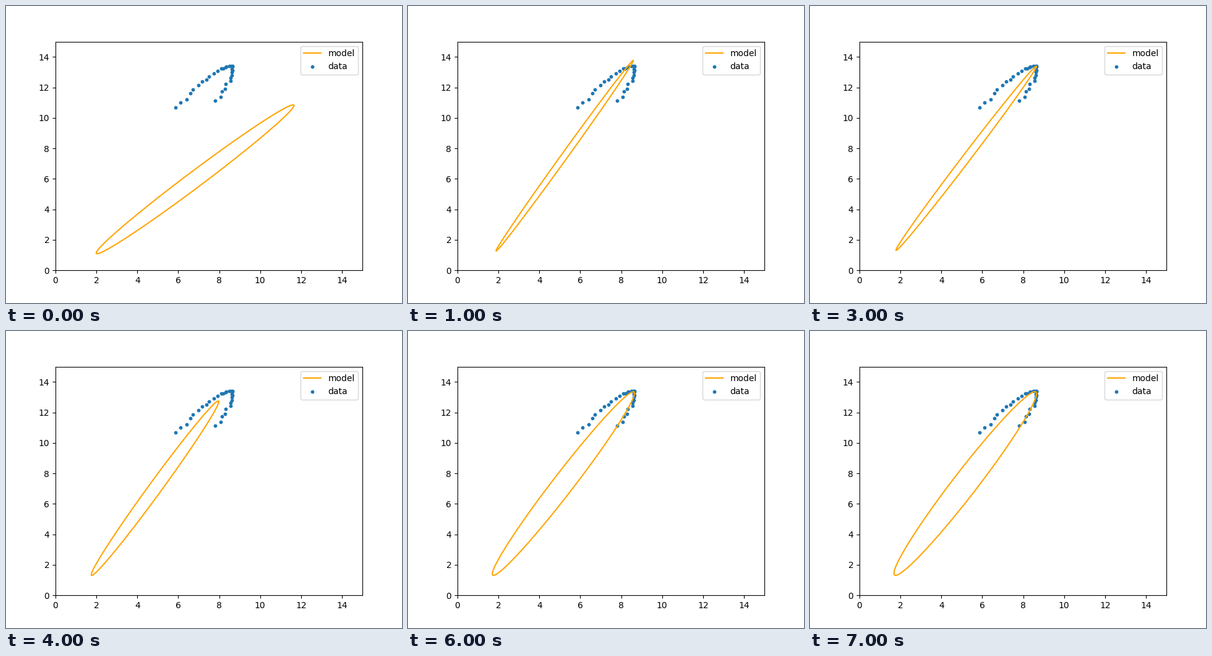
Recreate the animation shown at these times as a matplotlib script. Size 640x480 px, loop 8 s.

```python
import numpy as np
import matplotlib.pyplot as plt
from matplotlib.animation import FuncAnimation

STEPS = 8

# Upper right end of the model and its slimness at the key steps of the fit
KEYS = [0, 1, 3, 4, 5, 7]
RIGHT = [11.65, 8.59, 8.64, 7.98, 8.65, 8.65]
TOP = [10.85, 13.76, 13.38, 12.75, 13.35, 13.36]
PHASE = [0.135, 0.057, 0.071, 0.125, 0.152, 0.215]


def noisy_arc(count=30, step=0.08, noise=0.04):
    """Points along part of a slanted ellipse."""
    rng = np.random.default_rng(4)
    i = np.arange(count)
    x = 5.87 + 2.8 * np.cos(step * (i - 19.5))
    y = 9.22 + 4.2 * np.cos(step * (i - 15.2))
    return x + rng.normal(0, noise, count), y + rng.normal(0, noise, count)


def ellipse(left, right, bottom, top, phase):
    """Ellipse inside a bounding box; a small phase makes it slim."""
    t = np.linspace(0, 2 * np.pi, 400)
    x = (left + right) / 2 + (right - left) / 2 * np.cos(t)
    y = (bottom + top) / 2 + (top - bottom) / 2 * np.cos(t - phase)
    return x, y


def fit(i):
    """Model curve after i steps: the lower end settles, the upper one hunts."""
    left = 1.99 * (i + 1) ** -0.08
    bottom = 1.31 - 0.22 * 0.2 ** i
    right, top, phase = (np.interp(i, KEYS, k) for k in (RIGHT, TOP, PHASE))
    return ellipse(left, right, bottom, top, phase)


fig, ax = plt.subplots(figsize=(6.4, 4.8), dpi=100)
model, = ax.plot(*fit(0), color="orange", label="model")
ax.scatter(*noisy_arc(), s=10, label="data")
ax.set_xlim(0, 15)
ax.set_ylim(0, 15)
ax.legend(loc="upper right")


def update(i):
    model.set_data(*fit(i))
    return model,


anim = FuncAnimation(fig, update, frames=STEPS, interval=1000,
                     repeat=True, repeat_delay=0)
plt.show()
```
